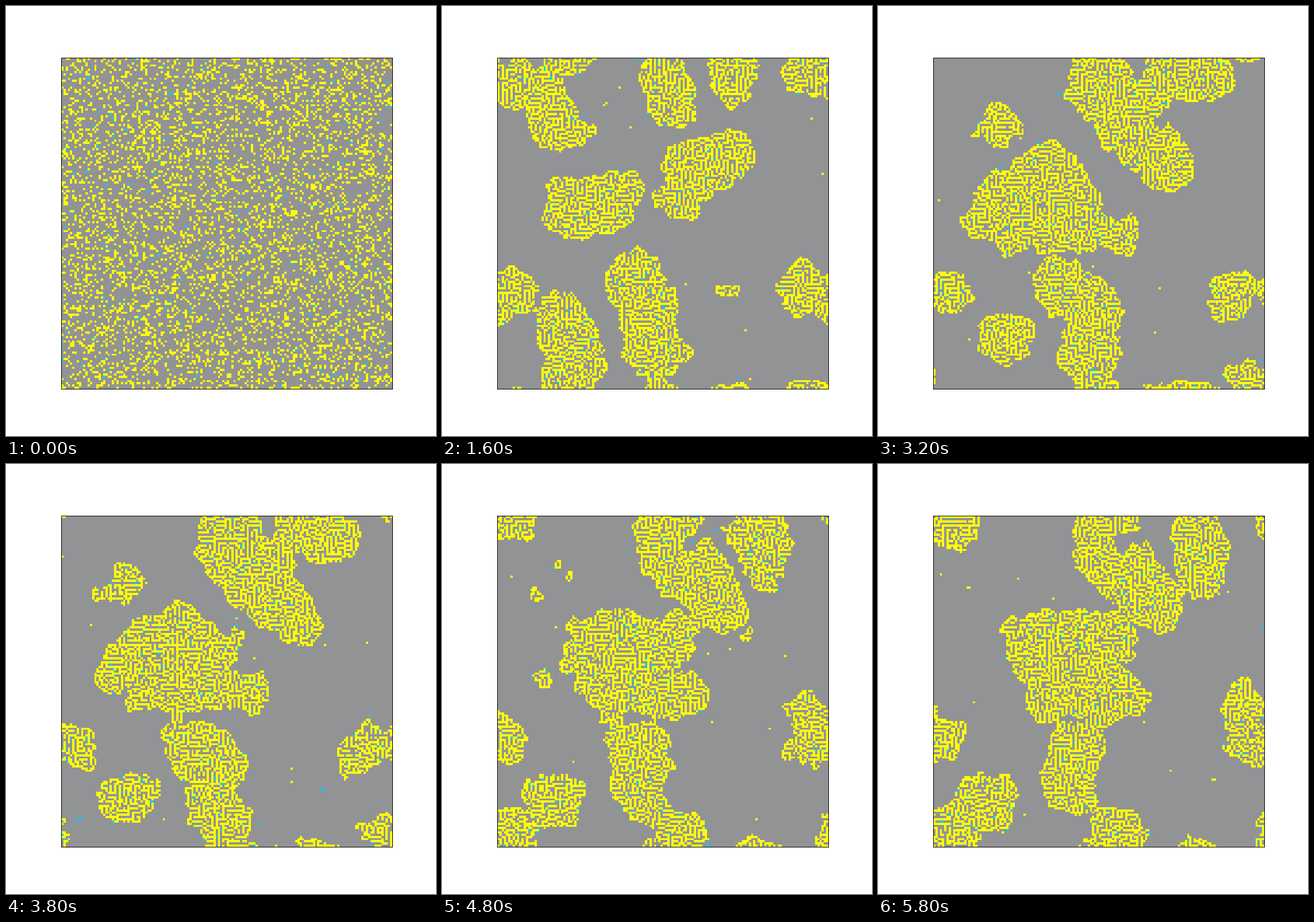
These frames come from a looping animation (748x748 px, 6 s). A matplotlib script:

```python
import numpy as np
import matplotlib.pyplot as plt
from matplotlib.animation import FuncAnimation
from matplotlib.colors import ListedColormap

# Termites gathering wood chips on a wrapped grid.
STAGE, LEFT, TOP, SIDE = 748, 96, 90, 576
N, FRAMES, STEP = 150, 30, 200
CELL = SIDE / N
DENSITY, PACKED, TERMITES = 0.225, 0.57, 125
FIRST, MIDDLE, LAST = 8, 16, 27

rng = np.random.default_rng(12)
gy, gx = np.mgrid[:N, :N] + 0.5


def wrap(d):
    return (d + N / 2) % N - N / 2


def stroke(r, *pts):
    """Signed depth inside a round brush stroke given in stage pixels."""
    p = (np.array(pts, float).reshape(-1, 2) - (LEFT, TOP)) / CELL
    if len(p) == 1:
        p = np.repeat(p, 2, axis=0)
    depth = np.full((N, N), -99.0)
    for a, b in zip(p, p[1:]):
        dx, dy = wrap(gx - a[0]), wrap(gy - a[1])
        vx, vy = b - a
        t = np.clip((dx * vx + dy * vy) / (vx * vx + vy * vy + 1e-9), 0, 1)
        depth = np.maximum(depth, r / CELL - np.hypot(dx - t * vx, dy - t * vy))
    return depth


def piles(*strokes):
    return np.maximum.reduce([stroke(*s) for s in strokes]).clip(-8, 6)


early = piles(
    (26, 125, 135, 175, 145, 200, 210), (26, 382, 115, 405, 170),
    (30, 505, 120), (27, 638, 115), (27, 420, 330, 430, 280, 500, 262),
    (33, 230, 355, 300, 335), (34, 340, 470, 355, 530, 370, 595),
    (34, 112, 505), (34, 205, 550, 235, 610, 220, 645), (30, 630, 490))
middle = piles(
    (20, 210, 208), (44, 388, 135), (27, 500, 115, 575, 120),
    (32, 450, 175, 435, 220, 500, 270), (28, 345, 340, 295, 270, 190, 365),
    (22, 230, 385, 415, 400), (34, 320, 485, 380, 535, 365, 615),
    (34, 220, 578), (24, 122, 495), (28, 618, 505), (17, 640, 640))
late = piles(
    (28, 128, 108), (22, 380, 105, 385, 165), (32, 555, 120, 560, 190),
    (38, 440, 190, 480, 235), (44, 270, 320, 390, 310),
    (32, 310, 400, 420, 405), (34, 340, 490, 335, 560), (34, 195, 590),
    (30, 130, 640), (24, 106, 475), (23, 640, 415, 650, 490), (34, 415, 645))


def target(n):
    u = np.clip((n - FIRST) / (MIDDLE - FIRST), 0, 1)
    v = np.clip((n - MIDDLE) / (LAST - MIDDLE), 0, 1)
    return (1 - u) * early + (u - v) * middle + v * late


def blur(img, sigma):
    f = np.fft.fftfreq(N)
    g = np.exp(-2 * (np.pi * sigma) ** 2 * (f[:, None] ** 2 + f ** 2))
    out = np.fft.ifft2(np.fft.fft2(img) * g).real
    return (out - out.mean()) / out.std()


def settle(chips):
    """One step of the maze rule: born with 3 neighbours, kept with 1 to 5."""
    near = sum(np.roll(chips.astype(int), (i, j), (0, 1))
               for i in (-1, 0, 1) for j in (-1, 0, 1)) - chips
    return (near == 3) | (chips & (near >= 1) & (near <= 5))


def scatter(grid, allowed, count, value):
    spots = np.flatnonzero(allowed)
    grid.flat[rng.choice(spots, min(count, len(spots)), replace=False)] = value


def simulate():
    start = rng.random((N, N)) < DENSITY
    hold = rng.random((N, N))
    noise, drift = rng.normal(size=(2, N, N))
    grid = start.astype(int)
    scatter(grid, np.ones((N, N), bool), TERMITES, 2)
    out = [grid, grid]
    chips = start
    for n in range(2, FRAMES):
        s = min((n - 1) / (FIRST - 1), 1)
        loose = (1 - s) ** 4
        rest = DENSITY * loose
        area = (DENSITY - rest) / (PACKED - rest)
        turn = np.pi * n / FRAMES
        edge = blur(np.cos(turn) * noise + np.sin(turn) * drift, 3)
        field = (s * target(n) + (1 - s) * 4 * blur(noise, 1.5 + 4 * s)
                 + 1.2 * s * edge + 0.9 * blur(rng.normal(size=(N, N)), 1.3))
        mask = field > np.quantile(field, 1 - area)
        chips = chips & mask & (rng.random((N, N)) > 0.2)
        chips |= mask & (rng.random((N, N)) < 0.08)
        for _ in range(6):
            chips = settle(chips) & mask
        shown = chips & (rng.random((N, N)) > 0.04)
        shown |= start & ~mask & (hold < loose)
        grid = shown.astype(int)
        scatter(grid, ~mask & ~shown, 9, 1)
        scatter(grid, mask & ~shown, TERMITES, 2)
        out.append(grid)
    return out


grids = simulate()

fig = plt.figure(figsize=(STAGE / 100, STAGE / 100), dpi=100, facecolor="white")
ax = fig.add_axes([LEFT / STAGE, 1 - (TOP + SIDE) / STAGE, SIDE / STAGE, SIDE / STAGE])
ax.set_xticks([])
ax.set_yticks([])
for spine in ax.spines.values():
    spine.set_linewidth(0.72)
colors = ListedColormap(["#929395", "#ffff00", "#00ccff"])
image = ax.imshow(grids[0], cmap=colors, vmin=0, vmax=2,
                  interpolation="nearest", aspect="auto")


def draw(n):
    image.set_data(grids[n])
    return [image]


anim = FuncAnimation(fig, draw, frames=FRAMES, interval=STEP,
                     repeat=True, repeat_delay=0)
plt.show()
```
